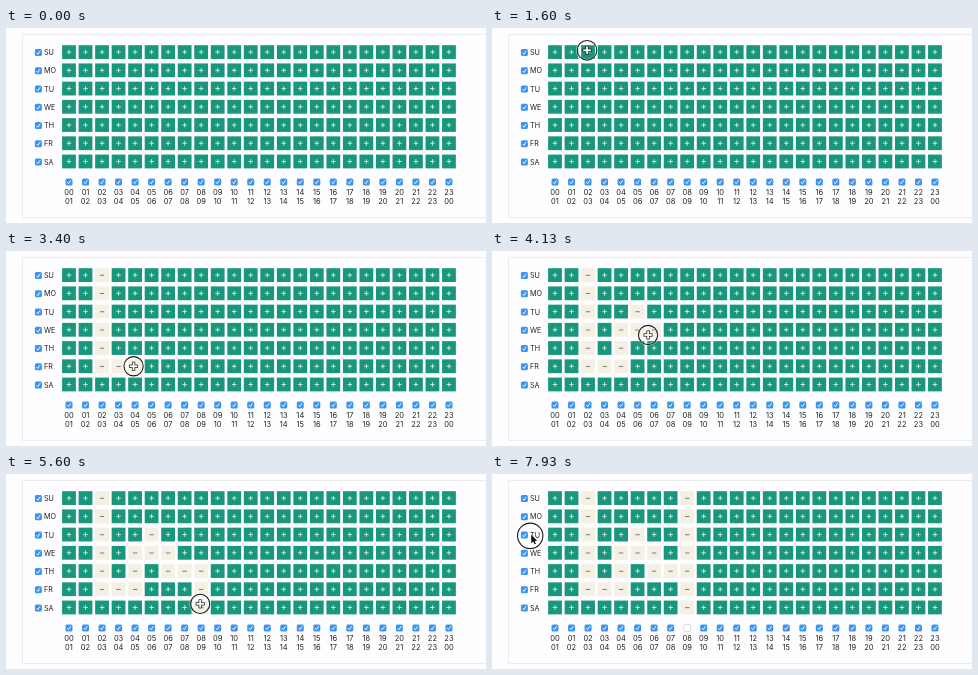
Recreate the animation shown at these times as an HTML page with a canvas. Size 480 by 195 pixels, loop 8 s.

```html
<!DOCTYPE html>
<html lang="en">
<head>
<meta charset="utf-8">
<title>Week schedule</title>
<style>
html, body { margin: 0; width: 100%; height: 100%; overflow: hidden; background: #fefdff; }
canvas { display: block; width: 480px; height: 195px; }
</style>
</head>
<body>
<canvas id="stage"></canvas>
<script>
const LOOP = 8000, STEP = 1000 / 15;
const DAYS = ['SU', 'MO', 'TU', 'WE', 'TH', 'FR', 'SA'];
const HOURS = 24;
const PAPER = '#fefdff', GREEN = '#18977d', BEIGE = '#f4f1e4', INK = '#222';
const colX = c => 63 + c * 16.52;
const rowY = r => 24.1 + r * 18.23;
const hour = h => String(h % HOURS).padStart(2, '0');

// Moments of the gesture, in ms
const APPEAR = 1400, PRESS = 1460, DRAG = 1770, RELEASE = 6400, CLICK = 7920;

// Key points of the pointer: time, column, row
const ROUTE = [
  [DRAG, 1.94, -.1], [2670, 2.24, 4.43], [2870, 2.3, 5], [3430, 4, 5],
  [3760, 4.1, 3.1], [3960, 5, 2.3], [4130, 5.63, 3.28], [4600, 6, 4],
  [5130, 8, 4], [5600, 7.94, 5.8], [6270, 7.75, .3], [7000, 7.75, .3],
  [7930, -1.5, 2.07]
];

const canvas = document.getElementById('stage');
const g = canvas.getContext('2d');
const scale = window.devicePixelRatio || 1;
canvas.width = 480 * scale;
canvas.height = 195 * scale;

function pointerAt(t) {
  const next = ROUTE.findIndex(p => p[0] > t);
  if (next === 0) return ROUTE[0].slice(1);
  if (next < 0) return ROUTE[ROUTE.length - 1].slice(1);
  const [t0, c0, r0] = ROUTE[next - 1], [t1, c1, r1] = ROUTE[next];
  const k = (t - t0) / (t1 - t0);
  return [c0 + (c1 - c0) * k, r0 + (r1 - r0) * k];
}

// Every cell the drag touches is switched off at that moment
const offTime = new Map();
for (let t = DRAG; t < RELEASE; t += 5) {
  const [c, r] = pointerAt(t), col = Math.round(c), row = Math.round(r);
  const key = col + ',' + row;
  const inside = Math.abs(c - col) < .42 && Math.abs(r - row) < .38;
  if (inside && !offTime.has(key)) offTime.set(key, t);
}
const isOff = (c, r, t) => offTime.get(c + ',' + r) <= t;
const columnChecked = (c, t) => t < RELEASE || !DAYS.every((_, r) => isOff(c, r, t));

function line(points, color, width) {
  g.beginPath();
  points.forEach(([x, y]) => g.lineTo(x, y));
  g.strokeStyle = color;
  g.lineWidth = width;
  g.stroke();
}

function minus(x, y, arm, color, width) {
  line([[x - arm, y], [x + arm, y]], color, width);
}

function plus(x, y, arm, color, width) {
  minus(x, y, arm, color, width);
  line([[x, y - arm], [x, y + arm]], color, width);
}

function cell(x, y, off) {
  g.fillStyle = off ? BEIGE : GREEN;
  g.fillRect(x - 6.9, y - 6.9, 13.8, 13.8);
  if (off) minus(x, y + .2, 2.2, '#555', .75);
  else plus(x, y, 2.3, '#eef9f5', .8);
}

function checkbox(x, y, checked) {
  g.beginPath();
  g.roundRect(x - 3.5, y - 3.5, 7, 7, 1.5);
  g.fillStyle = checked ? '#3b95ee' : '#fff';
  g.fill();
  if (checked) {
    line([[x - 1.7, y + .2], [x - .5, y + 1.7], [x + 1.8, y - 1.8]], '#fff', .9);
  } else {
    g.strokeStyle = '#c4c4c4';
    g.lineWidth = .6;
    g.stroke();
  }
}

function label(text, x, y, align, size) {
  g.font = `${size}px Inter, Roboto, sans-serif`;
  g.textAlign = align;
  g.fillStyle = INK;
  g.fillText(text, x, y);
}

// The ring lands around the pointer while the button is held
function ring(x, y, age) {
  const r = 9.6 + 3.4 * Math.max(0, 1 - age / 150);
  g.beginPath();
  g.arc(x, y, r, 0, Math.PI * 2);
  g.strokeStyle = 'rgba(255,255,255,.55)';
  g.lineWidth = 2.4;
  g.stroke();
  g.strokeStyle = '#1c1c1c';
  g.lineWidth = 1.1;
  g.stroke();
}

function arrow(x, y) {
  g.beginPath();
  [[0, 0], [0, 8.4], [2, 6.6], [3.4, 9.4], [4.7, 8.8], [3.5, 6.1], [6, 6]]
    .forEach(([dx, dy]) => g.lineTo(x + dx, y + dy));
  g.closePath();
  g.fillStyle = '#111';
  g.strokeStyle = '#fff';
  g.lineWidth = .8;
  g.stroke();
  g.fill();
}

function pointer(t) {
  if (t < APPEAR) return;
  const [c, r] = pointerAt(t), x = colX(c), y = rowY(r);
  if (t >= PRESS && t < RELEASE) ring(x, y, t - PRESS);
  if (t >= CLICK) ring(x, y, t - CLICK);
  if (c < -.5) return arrow(x + 1, y - 1);
  plus(x, y, 4.5, '#222', 3.3);
  plus(x, y, 3.8, '#fff', 1.8);
}

function draw(t) {
  g.setTransform(scale, 0, 0, scale, 0, 0);
  g.fillStyle = PAPER;
  g.fillRect(0, 0, 480, 195);
  line([[481, 6.5], [16.5, 6.5], [16.5, 189.5], [481, 189.5]], '#ececee', 1);

  DAYS.forEach((day, r) => {
    const y = rowY(r);
    checkbox(32.4, y + .5, true);
    label(day, 38, y + 3.1, 'left', 7.2);
    for (let c = 0; c < HOURS; c++) cell(colX(c), y, isOff(c, r, t));
  });
  for (let c = 0; c < HOURS; c++) {
    const x = colX(c);
    checkbox(x, 154, columnChecked(c, t));
    label(hour(c), x, 166.7, 'center', 7.5);
    label(hour(c + 1), x, 175.6, 'center', 7.5);
  }
  pointer(t);
}

const start = performance.now();
function tick() {
  const t = (performance.now() - start) % LOOP;
  draw(Math.floor((t + 4) / STEP) * STEP % LOOP);
  requestAnimationFrame(tick);
}
tick();
</script>
</body>
</html>
```
